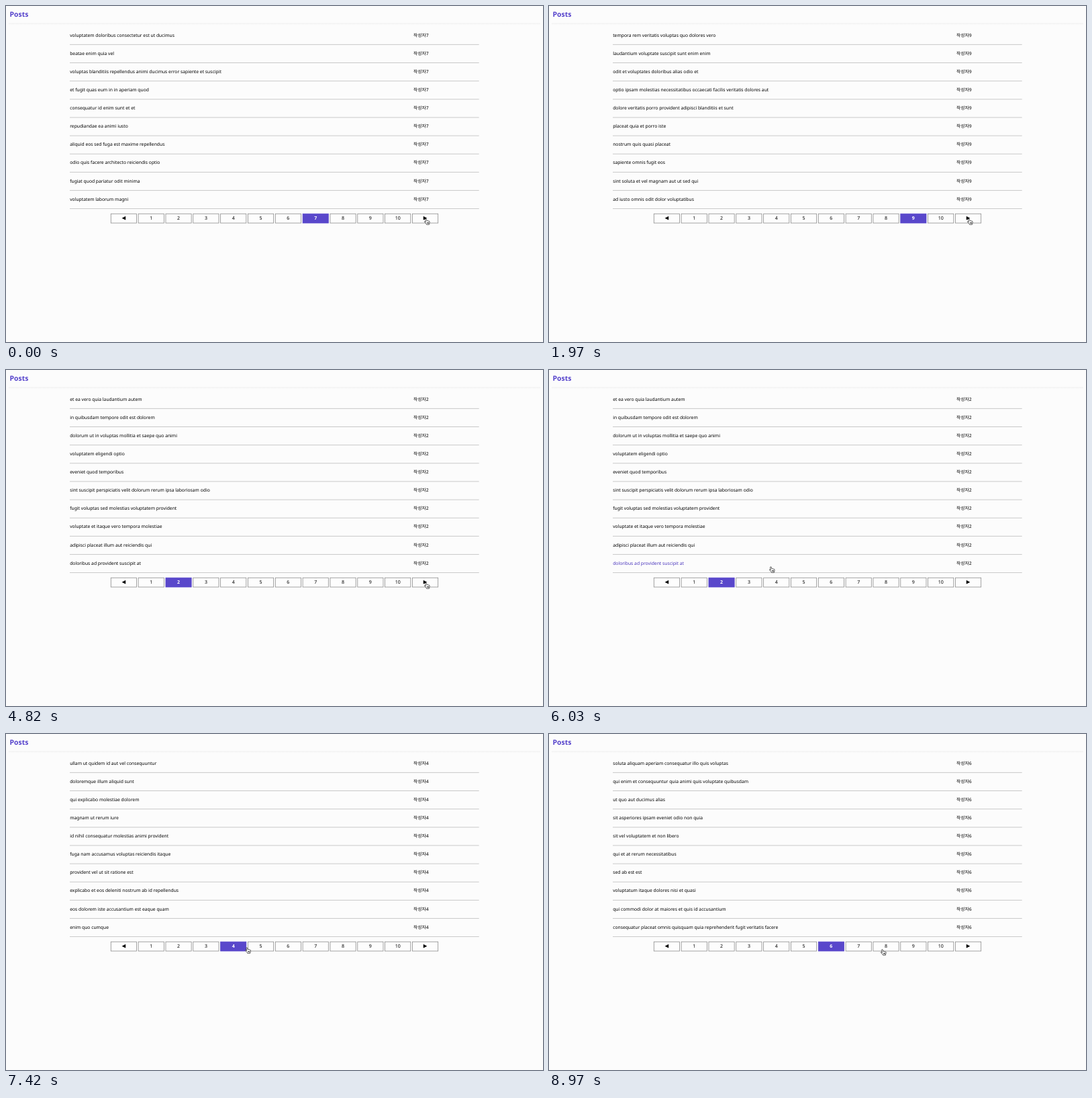
An HTML page for the animation above (9000 ms loop, 800 px wide and 500 px high).

```html
<!DOCTYPE html>
<html lang="ko">
<head>
<meta charset="utf-8">
<title>Posts</title>
<style>
html, body { margin: 0; width: 100%; height: 100%; overflow: hidden; background: #fcfcfc; }
svg { display: block; width: 100vw; height: 100vh; }
text { font: 6.75px "Noto Sans", "Noto Sans CJK KR", sans-serif; text-rendering: geometricPrecision; }
.mid { text-anchor: middle; font-size: 7px; }
.title { font-size: 10.4px; font-weight: 600; fill: #5441cb; }
.box { fill: #fdfdfd; stroke: #8c8c8c; stroke-width: .8; }
.on .box { fill: #5947cb; stroke: #5947cb; }
.on text { fill: #fff; font-weight: 700; }
.hover { fill: #4a35bd; }
.rule { stroke: #c9c9c9; stroke-width: 1; }
</style>
</head>
<body>
<svg id="stage" viewBox="0 0 800 500">
  <defs>
    <linearGradient id="shade" x2="0" y2="1">
      <stop offset="0" stop-color="#f0f0f0"/>
      <stop offset="1" stop-color="#fcfcfc"/>
    </linearGradient>
  </defs>
  <rect width="800" height="500" fill="#fcfcfc"/>
  <rect x="4" y="25.5" width="792" height="2.5" fill="url(#shade)"/>
  <text class="title" x="5.6" y="15.7">Posts</text>
</svg>
<script>
const LOOP = 9000;
const TOP = 43.2, STEP = 27.13, PITCH = 40.83;

const posts = {
  1: `sunt aut facere repellat provident occaecati excepturi optio reprehenderit
qui est esse
ea molestias quasi exercitationem repellat qui ipsa sit aut
eum et est occaecati
nesciunt quas odio
dolorem eum magni eos aperiam quia
magnam facilis autem
dolorem dolore est ipsam
nesciunt iure omnis dolorem tempora et accusantium
optio molestias id quia eum`,
  2: `et ea vero quia laudantium autem
in quibusdam tempore odit est dolorem
dolorum ut in voluptas mollitia et saepe quo animi
voluptatem eligendi optio
eveniet quod temporibus
sint suscipit perspiciatis velit dolorum rerum ipsa laboriosam odio
fugit voluptas sed molestias voluptatem provident
voluptate et itaque vero tempora molestiae
adipisci placeat illum aut reiciendis qui
doloribus ad provident suscipit at`,
  4: `ullam ut quidem id aut vel consequuntur
doloremque illum aliquid sunt
qui explicabo molestiae dolorem
magnam ut rerum iure
id nihil consequatur molestias animi provident
fuga nam accusamus voluptas reiciendis itaque
provident vel ut sit ratione est
explicabo et eos deleniti nostrum ab id repellendus
eos dolorem iste accusantium est eaque quam
enim quo cumque`,
  6: `soluta aliquam aperiam consequatur illo quis voluptas
qui enim et consequuntur quia animi quis voluptate quibusdam
ut quo aut ducimus alias
sit asperiores ipsam eveniet odio non quia
sit vel voluptatem et non libero
qui et at rerum necessitatibus
sed ab est est
voluptatum itaque dolores nisi et quasi
qui commodi dolor at maiores et quis id accusantium
consequatur placeat omnis quisquam quia reprehenderit fugit veritatis facere`,
  7: `voluptatem doloribus consectetur est ut ducimus
beatae enim quia vel
voluptas blanditiis repellendus animi ducimus error sapiente et suscipit
et fugit quas eum in in aperiam quod
consequatur id enim sunt et et
repudiandae ea animi iusto
aliquid eos sed fuga est maxime repellendus
odio quis facere architecto reiciendis optio
fugiat quod pariatur odit minima
voluptatem laborum magni`,
  8: `et iusto veniam et illum aut fuga
sint hic doloribus consequatur eos non id
consequuntur deleniti eos quia temporibus ab aliquid at
enim unde ratione doloribus quas enim ut sit sapiente
dignissimos eum dolor ut enim et delectus in
doloremque officiis ad et non perferendis
necessitatibus quasi exercitationem odio
quam voluptatibus rerum veritatis
pariatur consequatur quia magnam autem omnis non amet
labore in ex et explicabo corporis aut quas`,
  9: `tempora rem veritatis voluptas quo dolores vero
laudantium voluptate suscipit sunt enim enim
odit et voluptates doloribus alias odio et
optio ipsam molestias necessitatibus occaecati facilis veritatis dolores aut
dolore veritatis porro provident adipisci blanditiis et sunt
placeat quia et porro iste
nostrum quis quasi placeat
sapiente omnis fugit eos
sint soluta et vel magnam aut ut sed qui
ad iusto omnis odit dolor voluptatibus`,
  10: `aut amet sed
ratione ex tenetur perferendis
beatae soluta recusandae
qui qui voluptates illo iste minima
id minus libero illum nam ad officiis
quaerat velit veniam amet cupiditate aut numquam ut sequi
quas fugiat ut perspiciatis vero provident
laboriosam dolor voluptates
temporibus sit alias delectus eligendi possimus magni
at nam consequatur ea labore ea harum`
};

// [time, page]
const turns = [[0, 7], [520, 8], [1420, 9], [2420, 10], [3670, 1], [4820, 2], [6910, 4], [7970, 6]];

// [time, x, y] of the pointer tip
const route = [
  [0, 625.5, 316.5], [5640, 625.5, 316.5], [5760, 560, 306], [5900, 420, 297],
  [6030, 330.5, 292.6], [6150, 326.5, 299], [6360, 328.5, 316.5], [7300, 328.5, 316.5],
  [7420, 358.5, 317.6], [7600, 402, 319], [7760, 418.5, 319], [8250, 418.5, 319],
  [8500, 450, 325], [8850, 494, 326], [8970, 496.5, 320.4], [LOOP, 496.5, 320.4]
];

const stage = document.getElementById('stage');

function add(tag, attrs, parent = stage, label = '') {
  const el = document.createElementNS('http://www.w3.org/2000/svg', tag);
  for (const k in attrs) el.setAttribute(k, attrs[k]);
  el.textContent = label;
  parent.appendChild(el);
  return el;
}

const rows = Array.from({ length: 10 }, (_, i) => {
  const y = TOP + i * STEP;
  add('line', { class: 'rule', x1: 95, x2: 704.7, y1: y + 14.2, y2: y + 14.2 });
  return {
    y,
    name: add('text', { x: 95.2, y: y + 2.3 }),
    author: add('text', { x: 607, y: y + 2.3 })
  };
});

const buttons = Array.from({ length: 12 }, (_, i) => {
  const x = 156.3 + i * PITCH, mid = x + 19.1;
  const g = add('g', {});
  add('rect', { class: 'box', x, y: 309.2, width: 38.2, height: 13.8 }, g);
  if (i % 11) add('text', { class: 'mid', x: mid, y: 318.3 }, g, i);
  else {
    const d = i ? 2.8 : -2.8;
    add('path', { d: `M${mid - d} 312.8L${mid + d} 315.7L${mid - d} 318.6Z` }, g);
  }
  return g;
});

const outline = { fill: '#fff', stroke: '#111', 'stroke-width': .7, 'stroke-linejoin': 'round' };
const hand = add('path', {
  ...outline,
  d: 'M-.9 1.2Q-.9 .2 0 .2Q.7 .2 .9 1L1.5 3.2Q2.2 2.6 2.9 3.3Q3.7 2.8 4.2 3.6Q5.3 3.3 5.5 4.4'
   + 'Q5.9 6.2 5 7.4L4.9 8.7H1L.7 7.8Q-.5 6.9 -1.2 5.7Q-2.4 4.7 -1.9 4.2Q-1.2 3.8 -.1 5Z'
   + 'M1.9 5.4V7.2M3 5.4V7.2M4 5.4V7.2'
});
const arrow = add('path', { ...outline, fill: '#111', stroke: '#fff', d: 'M0 0V8.6L2 6.8L3.3 9.6L4.7 9L3.5 6.2H6.2Z' });

function pointerAt(t) {
  const i = route.findIndex(p => p[0] > t);
  const [t0, x0, y0] = route[i - 1], [t1, x1, y1] = route[i];
  const k = (t - t0) / (t1 - t0);
  return [x0 + (x1 - x0) * k, y0 + (y1 - y0) * k];
}

let shown = 0;

function showPage(page) {
  if (page === shown) return;
  shown = page;
  const names = posts[page].split('\n');
  rows.forEach((row, i) => {
    row.name.textContent = names[i];
    row.author.textContent = '작성자' + page;
  });
  buttons.forEach((b, i) => b.setAttribute('class', i === page ? 'on' : ''));
}

function draw(t) {
  showPage(turns.filter(s => s[0] <= t).pop()[1]);
  const [x, y] = pointerAt(t);
  let onRow = false;
  for (const row of rows) {
    const over = x > 95 && x < 600 && Math.abs(y - row.y) < 13;
    row.name.setAttribute('class', over ? 'hover' : '');
    onRow = onRow || over;
  }
  const link = onRow || (y > 309 && y < 323.5);
  hand.style.display = link ? '' : 'none';
  arrow.style.display = link ? 'none' : '';
  (link ? hand : arrow).setAttribute('transform', `translate(${x} ${y})`);
}

const start = performance.now();
function tick() {
  draw((performance.now() - start) % LOOP);
  requestAnimationFrame(tick);
}
tick();
</script>
</body>
</html>
```
